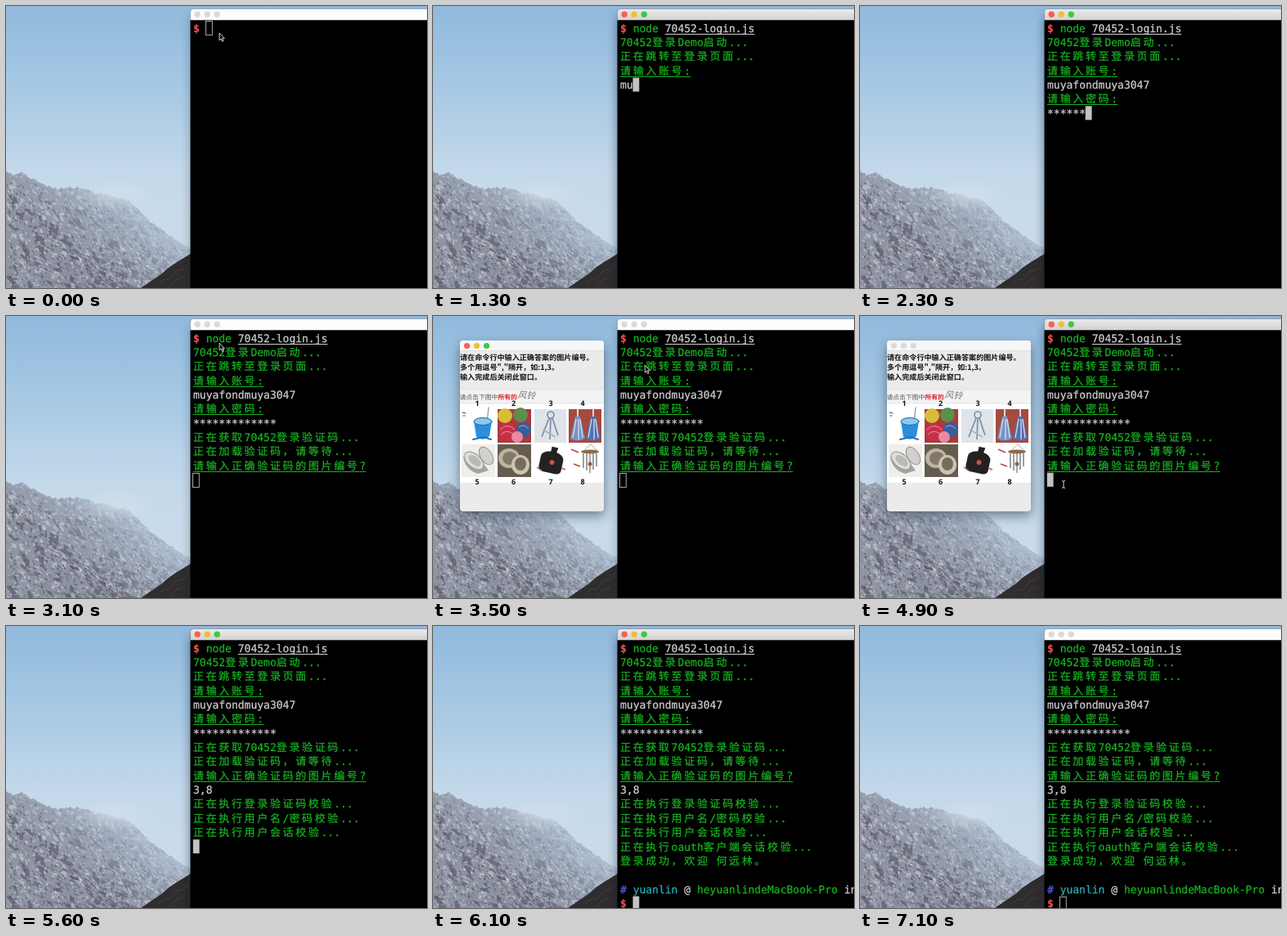
These frames come from a looping animation (515 by 345 pixels, 7.2 s). An HTML page:

```html
<!DOCTYPE html>
<html lang="zh">
<head>
<meta charset="utf-8">
<title>Terminal login demo</title>
<style>
html, body { margin: 0; width: 100%; height: 100%; overflow: hidden; background: #000; }
svg { display: block; width: 515px; height: 345px; text-rendering: geometricPrecision; }
.mono { font: 13px "DejaVu Sans Mono", monospace; white-space: pre; }
.han { font: 13px "Noto Sans CJK SC", "Noto Sans CJK", sans-serif; letter-spacing: 2.652px; }
.mono, .han { stroke-width: .25; }
.note { font: 600 9.1px "Noto Sans CJK SC", "Noto Sans CJK", sans-serif; fill: #111; }
.num { font: bold 9px "Open Sans", "Noto Sans", sans-serif; fill: #111; text-anchor: middle; }
</style>
</head>
<body>
<svg viewBox="0 0 515 345" xmlns="http://www.w3.org/2000/svg">
  <defs>
    <linearGradient id="sky" x1="0" y1="0" x2="0" y2="1">
      <stop offset="0" stop-color="#91b9dc"/>
      <stop offset=".3" stop-color="#a7c9e4"/>
      <stop offset=".58" stop-color="#c3d8ea"/>
      <stop offset=".75" stop-color="#c9dbea"/>
    </linearGradient>
    <linearGradient id="haze" gradientUnits="userSpaceOnUse" x1="160" y1="226" x2="92" y2="306">
      <stop offset="0" stop-color="#bfd2e4" stop-opacity=".85"/>
      <stop offset=".4" stop-color="#b4c6da" stop-opacity=".5"/>
      <stop offset="1" stop-color="#b4c6da" stop-opacity="0"/>
    </linearGradient>
    <radialGradient id="fog">
      <stop offset="0" stop-color="#d5e0ec" stop-opacity=".7"/>
      <stop offset="1" stop-color="#d5e0ec" stop-opacity="0"/>
    </radialGradient>
    <linearGradient id="bar" x1="0" y1="0" x2="0" y2="1">
      <stop offset="0" stop-color="#ebebeb"/>
      <stop offset="1" stop-color="#d2d2d2"/>
    </linearGradient>
    <filter id="soft" x="-30%" y="-30%" width="160%" height="160%"><feGaussianBlur stdDeviation="7"/></filter>
    <clipPath id="land"><path id="landClip"/></clipPath>
  </defs>

  <rect width="515" height="345" fill="url(#sky)"/>
  <path id="ridge" fill="#8f94a3"/>
  <g id="crags" clip-path="url(#land)"></g>
  <rect y="195" width="226" height="150" fill="url(#haze)" clip-path="url(#land)"/>
  <ellipse cx="135" cy="230" rx="52" ry="20" fill="url(#fog)"/>
  <path d="M165 345L178 336 190 328 199 320 211 312 226 303V345Z" fill="#302d2e"/>
  <path d="M186 340l8-6 6 1 8-11 9-2 6-7M201 343l7-8 9-3" fill="none" stroke="#443f3e"/>

  <g id="viewer">
    <rect x="32" y="36" width="178" height="209" rx="5" fill="#1b2a3c" opacity=".5" filter="url(#soft)"/>
    <rect x="33" y="30" width="176" height="209" rx="4" fill="#ebebeb"/>
    <path d="M33 43V34a4 4 0 0 1 4-4H205a4 4 0 0 1 4 4V43Z" fill="#f7f7f7"/>
    <path d="M33 42.5H209" stroke="#d4d4d4" stroke-width=".7"/>
    <g id="viewDots"></g>
    <g class="note">
      <text x="33" y="53.5">请在命令行中输入正确答案的图片编号。</text>
      <text x="33" y="65.7">多个用逗号","隔开，如:1,3。</text>
      <text x="33" y="78">输入完成后关闭此窗口。</text>
    </g>
    <rect x="33" y="90" width="176" height="17" fill="#f3f3f3"/>
    <rect x="33" y="107" width="176" height="97" fill="#fff"/>
    <path d="M33 90H209M33 107H209" stroke="#dcdcdc" stroke-width=".7"/>
    <g style="font:7.8px 'Noto Sans CJK SC','Noto Sans CJK',sans-serif">
      <text x="32.5" y="101.5" fill="#555">请点击下图中</text>
      <text x="79.5" y="101.5" fill="#e0202c" font-weight="700">所有的</text>
      <text font-size="11" font-style="italic" fill="#777" transform="translate(103 100) rotate(4)">风铃</text>
    </g>
    <g id="nums" class="num"></g>

    <g fill="none" stroke-linecap="round">
      <path d="M36 118l4 1M37 122l2 0" stroke="#444"/>
      <path d="M68 112L64 149" stroke="#8a9bac" stroke-width="1.3"/>
      <path d="M50 129L53 148Q61 154 69 147L72 129Z" fill="#2c8fdc" stroke="none"/>
      <ellipse cx="61" cy="129" rx="11" ry="4.5" fill="#8fc8ee" stroke="#1767ae"/>
      <path d="M49 151l13-3 9 3" stroke="#2a6fb0" stroke-width="2"/>
    </g>
    <g>
      <rect x="79" y="114" width="41" height="41" fill="#a93a3c"/>
      <circle cx="88" cy="122" r="9" fill="#d9bd36"/>
      <circle cx="107" cy="121" r="9" fill="#5c8f4b"/>
      <circle cx="91" cy="142" r="11" fill="#c92f49"/>
      <circle cx="111" cy="139" r="9" fill="#345f9e"/>
      <circle cx="103" cy="148" r="7" fill="#e58aa0"/>
      <path d="M82 139q9-9 18 0M83 145q8-8 17 1M105 136q6-5 12 2" fill="none" stroke="#f0c1c0" stroke-width=".7"/>
    </g>
    <g>
      <rect x="124" y="114" width="39" height="41" fill="#dfe4e9"/>
      <g fill="none" stroke="#7c8fa8" stroke-width="1.7">
        <circle cx="144" cy="121" r="4"/>
        <path d="M142 125L133 148M146 125L153 146M144 126L143 151"/>
        <path d="M134 139l16 9" stroke="#a9b4c0"/>
      </g>
    </g>
    <g>
      <rect x="166" y="114" width="40" height="41" fill="#a54a3c"/>
      <path d="M177 114V124M196 114V124" stroke="#d8d8d8" stroke-width="2"/>
      <path d="M174 123h6l6 27q-9 5-18 0Z" fill="#7892c7"/>
      <path d="M193 123h6l6 27q-9 5-18 0Z" fill="#536fb3"/>
      <path d="M175 126l-4 23M178 126v25M180 126l3 23M194 126l-4 23M197 126v25M199 126l3 23" fill="none" stroke="#d7e0f0" stroke-width="1.3"/>
    </g>
    <g>
      <rect x="35" y="157" width="41" height="40" fill="#eeeeed"/>
      <path d="M37 172q2 16 18 21l13-4-15-21Z" fill="#a6a49f"/>
      <ellipse cx="50" cy="177" rx="14" ry="8" transform="rotate(40 50 177)" fill="#deddd9" stroke="#98958f"/>
      <ellipse cx="51" cy="177" rx="9" ry="5" transform="rotate(40 51 177)" fill="#bbb9b4"/>
      <ellipse cx="65" cy="171" rx="12" ry="7" transform="rotate(58 65 171)" fill="#d1d0cc" stroke="#96938e"/>
    </g>
    <g>
      <rect x="79" y="157" width="41" height="40" fill="#655b4e"/>
      <ellipse cx="93" cy="174" rx="13" ry="12" fill="#bcb4a1"/>
      <ellipse cx="94" cy="174" rx="9" ry="8" fill="#81786a"/>
      <ellipse cx="107" cy="182" rx="11" ry="12" fill="#cbc4b2"/>
      <ellipse cx="107" cy="181" rx="7" ry="8" fill="#776b5b"/>
    </g>
    <g transform="rotate(12 145 177)">
      <path d="M142 160h8l-1 6q10 2 10 8v12q0 6-7 6h-14q-7 0-7-6v-12q0-6 11-8Z" fill="#222"/>
      <circle cx="146" cy="179" r="3" fill="#c7504c"/>
    </g>
    <path d="M127 185l6 4M157 186l5 2" stroke="#c05a52" stroke-width="1.5"/>
    <g fill="none">
      <path d="M169 163l9 4M172 181l8 3" stroke="#b44a42" stroke-width="1.5"/>
      <path d="M193 157l-10 9M193 157l9 9" stroke="#9b8c78" stroke-width=".7"/>
      <ellipse cx="192" cy="166" rx="11" ry="2.5" fill="#8d6b46"/>
      <path d="M184 168v18M188 168v21M196 168v20M200 168v16" stroke="#8e979d" stroke-width="1.8"/>
      <path d="M192 168v24" stroke="#665342"/>
      <circle cx="192" cy="181" r="2.5" fill="#886545"/>
    </g>
  </g>

  <rect id="shade" x="227" y="14" width="330" height="360" fill="#0c1826" filter="url(#soft)"/>
  <path d="M225.5 345V8a4.5 4.5 0 0 1 4.5-4.5H515V345Z"/>
  <path id="title" d="M225.5 17.3V8a4.5 4.5 0 0 1 4.5-4.5H515V17.3Z"/>
  <g id="dots"></g>
  <g id="screen"></g>
  <rect id="cursor" width="7.8" height="17"/>
  <path id="arrow" d="M0 0V9L2.1 7.2 3.6 10.4 5 9.8 3.6 6.7H6.3Z" fill="#111" stroke="#e0e0e0" stroke-width=".9"/>
  <path id="beam" d="M-2-4.5Q0-4.5 0-3Q0-4.5 2-4.5M0-3V3M-2 4.5Q0 4.5 0 3Q0 4.5 2 4.5" fill="none" stroke="#d0d0d0"/>
</svg>
<script>
const LOOP = 7200, STEP = 100;
const CELL = 7.826, LINE = 17.35, LEFT = 229, MID = 27;
const GREEN = '#17b321', WHITE = '#cfcfcf', RED = '#ea524d';
const $ = id => document.getElementById(id);
const set = (el, attrs) => { for (const k in attrs) el.setAttribute(k, attrs[k]); return el; };
const add = (parent, tag, attrs) =>
  parent.appendChild(set(document.createElementNS('http://www.w3.org/2000/svg', tag), attrs));
const show = (el, on) => { el.style.display = on ? '' : 'none'; };

// Mountains: a jagged ridge filled with small seeded facets.
const PEAKS = [[0, 203], [8, 207], [20, 204], [30, 211], [38, 214], [48, 220], [62, 224], [76, 222],
  [97, 223], [108, 229], [122, 230], [150, 239], [162, 250], [176, 263], [200, 281], [226, 298]];
function ridgeY(x) {
  const i = Math.max(1, PEAKS.findIndex(p => p[0] >= x));
  const [a, b] = PEAKS[i - 1], [c, d] = PEAKS[i];
  return b + (d - b) * (x - a) / (c - a);
}
function drawLand() {
  let seed = 11;
  const rnd = () => (seed = (seed * 16807) % 2147483647) / 2147483647;
  let outline = 'M0 345';
  for (let x = 0; x <= 226; x += 2) outline += `L${x} ${(ridgeY(x) + rnd() * 3 - 1.5).toFixed(1)}`;
  outline += 'V345Z';
  set($('ridge'), { d: outline });
  set($('landClip'), { d: outline });

  // Dark rock gathers towards the foot, snow towards the crest.
  const facets = (fill, count, size, bias) => {
    let d = '';
    for (let i = 0; i < count; i++) {
      const x = rnd() * 226, top = ridgeY(x), y = top + (345 - top) * rnd() ** bias;
      const w = size * (.4 + rnd()), h = size * (.4 + rnd()), lean = (rnd() - .35) * size;
      d += `M${x.toFixed(1)} ${y.toFixed(1)}l${w.toFixed(1)} ${(h * .4).toFixed(1)} ${lean.toFixed(1)} ${h.toFixed(1)} ${(-w * .8).toFixed(1)} ${(-h * .7).toFixed(1)}z`;
    }
    add($('crags'), 'path', { d, fill, opacity: .6 });
  };
  facets('#555664', 170, 8, .7);
  facets('#cdd2dc', 200, 5, 1.2);
  facets('#4a4a59', 900, 2.6, .75);
  facets('#d9dce3', 900, 2.4, 1.1);
  facets('#747988', 600, 2.4, 1);
}

// Each row: time shown, segments [column, text, colour, underlined], optional typing.
const row = (at, text, under) => ({ at, segs: [[0, text, GREEN, under]] });
const input = (at, segs, start, pace, pre = 0) => ({ at, segs, start, pace, pre });
const rows = [
  input(0, [[0, '$', RED], [2, 'node', GREEN], [7, '70452-login.js', WHITE, true]], 300, 20, 2),
  row(800, '70452登录Demo启动...'),
  row(900, '正在跳转至登录页面...'),
  row(1100, '请输入账号:', true),
  input(1100, [[0, 'muyafondmuya3047', WHITE]], 1210, 43),
  row(2000, '请输入密码:', true),
  input(2000, [[0, '*'.repeat(13), WHITE]], 2050, 38),
  row(2600, '正在获取70452登录验证码...'),
  row(2700, '正在加载验证码，请等待...'),
  row(2900, '请输入正确验证码的图片编号?', true),
  input(2900, [[0, '3,8', WHITE]], 4930, 85),
  row(5400, '正在执行登录验证码校验...'),
  row(5500, '正在执行用户名/密码校验...'),
  row(5600, '正在执行用户会话校验...'),
  row(5700, '正在执行oauth客户端会话校验...'),
  row(5800, '登录成功，欢迎 何远林。'),
  row(5900, ''),
  { at: 5900, segs: [[0, '#', '#5560e8'], [2, 'yuanlin', '#2aa9b5'], [10, '@', WHITE],
    [12, 'heyuanlindeMacBook-Pro', GREEN], [35, 'in', WHITE]] },
  input(5900, [[0, '$', RED]], Infinity, 1, 2)
];
const isHan = s => s.charCodeAt(0) > 0x2000;
const px = col => LEFT + col * CELL;

function buildRows() {
  rows.forEach((r, i) => {
    const mid = MID + i * LINE;
    r.g = add($('screen'), 'g', {});
    r.runs = [];
    r.len = 0;
    for (const [start, text, fill, under] of r.segs) {
      let col = start;
      for (const part of text.match(/[^ -~]+|[ -~]+/g) || []) {
        const han = isHan(part), width = part.length * (han ? 2 : 1);
        const el = add(r.g, 'text', { x: px(col), y: mid + 4.6, fill, stroke: fill, class: han ? 'han' : 'mono' });
        if (fill === RED) el.style.fontWeight = 'bold';
        el.textContent = part;
        const line = under && add(r.g, 'path', { stroke: fill, 'stroke-width': 1 });
        r.runs.push({ el, part, col, width, line, y: Math.round(mid + 6.6) + .5 });
        col += width;
      }
      r.len = col;
    }
  });
}

function drawRows(t) {
  let at = [0, 0];
  rows.forEach((r, i) => {
    const on = t >= r.at;
    show(r.g, on);
    if (!on) return;
    let n = 99;
    if (r.pace) {
      const typed = Math.max(0, Math.floor((t - r.start) / r.pace));
      n = Math.min(Math.max(r.len, r.pre), r.pre + typed);
    }
    for (const run of r.runs) {
      const w = Math.max(0, Math.min(run.width, n - run.col));
      if (r.pace) run.el.textContent = run.part.slice(0, w);
      if (run.line) set(run.line, { d: `M${px(run.col)} ${run.y}H${px(run.col + w)}` });
    }
    at = r.pace ? [n, i] : [0, i + 1];
  });
  return at;
}

function makeDots(id, x, y, r) {
  return [0, 1, 2].map(i => add($(id), 'circle', { cx: x + i * 12, cy: y, r }));
}
const LIGHTS = ['#f95e57', '#f0bd3a', '#3fc746'];
const light = (dots, on) => dots.forEach((d, i) => set(d, { fill: on ? LIGHTS[i] : '#dadada' }));

drawLand();
buildRows();
const termDots = makeDots('dots', 234.2, 10.2, 3.7);
const viewDots = makeDots('viewDots', 41.5, 36.5, 3.6);
[54, 98.5, 144, 183].forEach((x, i) => {
  add($('nums'), 'text', { x, y: 110.3 }).textContent = i + 1;
  add($('nums'), 'text', { x, y: 206.3 }).textContent = i + 5;
});

function draw(t) {
  const focus = (t >= 200 && t < 3100) || (t >= 3800 && t < 6700);
  set($('title'), { fill: focus ? 'url(#bar)' : '#fdfdfd' });
  set($('shade'), { opacity: focus ? .62 : .36 });
  light(termDots, focus);

  const viewing = t >= 3300 && t < 5300;
  show($('viewer'), viewing);
  light(viewDots, viewing && !focus);

  const [col, line] = drawRows(t);
  const x = px(col) - .2, y = MID + line * LINE - 8.7;
  set($('cursor'), focus
    ? { x, y, fill: '#c2c2c2', stroke: 'none' }
    : { x: Math.floor(x) + .5, y: Math.round(y) + .5, fill: 'none', stroke: '#a6a6a6' });

  // Pointer: rests near the prompt, then glides down to the waiting cursor.
  const k = Math.min(1, Math.max(0, (t - 3400) / 400)), e = k * k * (3 - 2 * k);
  const place = `translate(${261 - 12 * e} ${33 + 173 * e})`;
  set($('arrow'), { transform: place });
  set($('beam'), { transform: place });
  show($('arrow'), t < 200 || (t >= 3100 && t < 3800));
  show($('beam'), (t >= 200 && t < 300) || (t >= 3800 && t < 5000));
}

const begin = performance.now();
function tick() {
  const ms = (performance.now() - begin) % LOOP;
  draw(Math.floor(ms / STEP) * STEP);
  requestAnimationFrame(tick);
}
tick();
</script>
</body>
</html>
```
